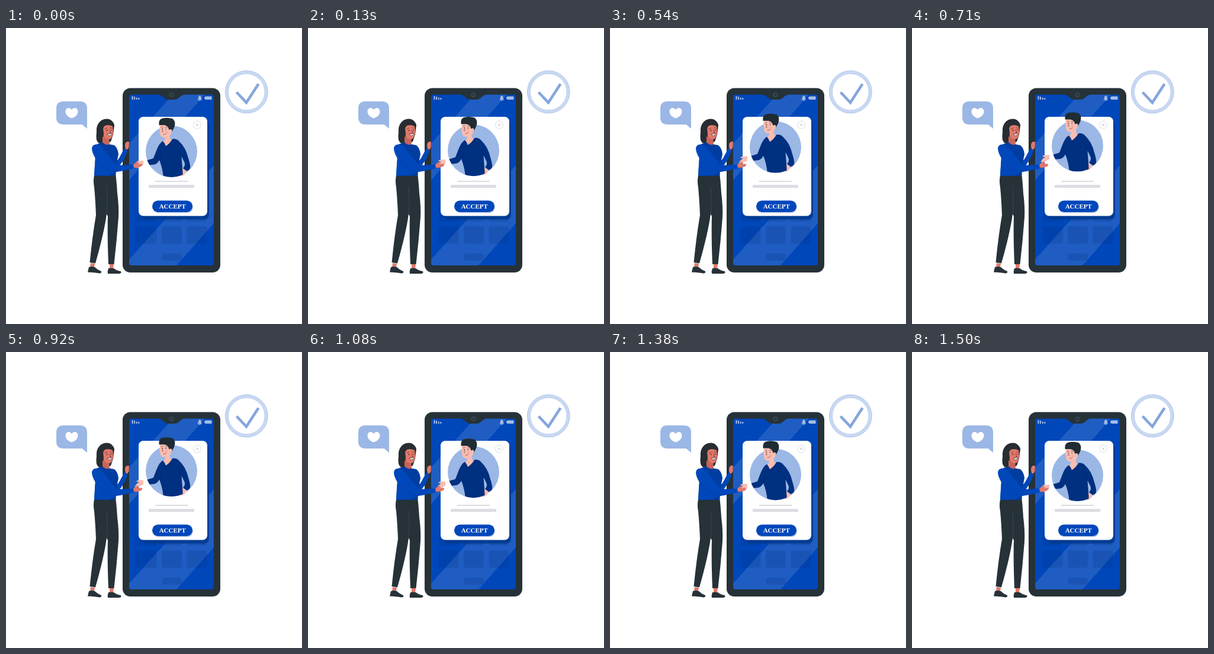
These frames come from a looping animation (500x500 px, 1.54 s). An HTML page:

```html
<!DOCTYPE html>
<html lang="en">
<head>
<meta charset="utf-8">
<style>
  html, body { margin: 0; width: 100%; height: 100%; overflow: hidden; background: #fff; }
  svg { display: block; width: 100%; height: 100%; }
  .line { fill: none; stroke-linecap: round; stroke-linejoin: round; }
</style>
</head>
<body>
<svg viewBox="0 0 500 500">
  <defs>
    <clipPath id="portrait"><path d="M210 130H350V208.5H323A43.5 43.5 0 0 1 236 208.5H210Z"/></clipPath>
  </defs>

  <g id="check" fill="none">
    <circle cx="406.3" cy="108" r="33.3" stroke="#c8d8f2" stroke-width="5.4"/>
    <circle cx="406.3" cy="108" r="36" stroke="#a5bce3" stroke-width=".7"/>
    <circle cx="406.3" cy="108" r="30.7" stroke="#b3c6e8" stroke-width=".6"/>
    <path d="M389.5 108.5 406 126 426.500 94.500" stroke="#85a6dc" stroke-width="4.6"/>
  </g>

  <g id="bubble">
    <path d="M97 124H125Q137 124 137 136V170L128.500 163H97Q85 163 85 151V136Q85 124 97 124Z" fill="#9bb7e5"/>
    <path d="M111 138C107 132.500 100.500 135 100.500 141C100.500 147 106 151 111 152.500C116 151 121.500 147 121.500 141C121.500 135 115 132.500 111 138Z" fill="#fff"/>
  </g>

  <g id="phone">
    <rect x="197" y="101.500" width="165" height="311.500" rx="13" fill="#263238"/>
    <path d="M212 112.500H256C265 112.500 266 121 275 121H284C293 121 294 112.500 303 112.500H347Q351 112.500 351 116.500V397Q351 401 347 401H212Q208 401 208 397V116.500Q208 112.500 212 112.500Z" fill="#0047ba"/>
    <path d="M274 121H284C293 121 294 112.500 303 112.500H336L208 257V195ZM351 232V330L288 401H212Q208 401 208 397V391Z" fill="#fff" opacity=".12"/>
    <circle cx="279.500" cy="113" r="4.300" fill="#37474f"/>
    <circle cx="279.500" cy="113" r="2.300" fill="#29363d"/>
    <g fill="#a5bde6">
      <path d="M212.500 115h2v6h-2zM216 116h2v5h-2zM219.700 117.500h2v3.500h-2zM223.300 118h2v3h-2z"/>
      <path d="M323.300 121.500Q325 120 325 117.500Q325 114.500 327.300 114Q329.700 114.500 329.700 117.500Q329.700 120 331.300 121.500ZM326 122h2.600v1H326z"/>
      <path d="M335 117.300l2-1.700h10.500v5.400H337l-2-1.700z"/>
    </g>
    <g fill="#002d78" opacity=".18">
      <rect x="221" y="300" width="34" height="27" rx="4"/>
      <rect x="263" y="300" width="34" height="27" rx="4"/>
      <rect x="305" y="300" width="34" height="27" rx="4"/>
      <rect x="220.500" y="335" width="34" height="29.500" rx="4"/>
      <rect x="263" y="335" width="34" height="29.500" rx="4"/>
      <rect x="305.500" y="335" width="34" height="29.500" rx="4"/>
      <rect x="263" y="381" width="34" height="12" rx="5"/>
    </g>
    <rect x="229" y="156" width="114" height="167.500" rx="8" fill="#00398f" opacity=".85"/>
    <rect x="224" y="150" width="116" height="167.500" rx="8" fill="#fff"/>
    <circle cx="323" cy="163.500" r="6.500" fill="none" stroke="#cfd3da" stroke-width=".8"/>
    <path d="M321 161.500l4 4m0-4l-4 4" stroke="#a9afba" stroke-width=".8"/>
    <path d="M252 258h55v2h-55zM241 265h77v5h-77z" fill="#dddce3"/>
    <rect x="248" y="293" width="68" height="19.500" rx="9.700" fill="#bccbe6"/>
    <rect x="247" y="291.500" width="68" height="19.500" rx="9.700" fill="#0047ba"/>
    <text x="281.300" y="305" fill="#fff" text-anchor="middle" font-family="'Liberation Serif', serif" font-weight="700" font-size="11">ACCEPT</text>
  </g>

  <g id="man">
    <circle cx="279.500" cy="208.500" r="43.500" fill="#9bb7e5"/>
    <path d="M232 224Q225 224 221.500 225L220 226.500 225 227.500Q220 230 217.500 235.500Q222 237.500 227 234L232 231Z" fill="#f9bdb1"/>
    <path d="M298 237Q293 240 293 247.500Q294 251 299 249.500Q303 247 306 240Z" fill="#f9bdb1"/>
    <path d="M276 177L277 187 283 190 270 200 265 192Q270 189 269 183Z" fill="#f9bdb1"/>
    <g fill="#003080" clip-path="url(#portrait)">
      <path d="M265 191Q268 194 270 199.500Q277 195 281 187.500Q288 186.500 292 191Q304 202 308 220Q312 233 311 237Q309 241 305 241.500L299 237Q304 232 301 226L296.500 217L298.500 244 299 255H266Q265 238 259 223Q256 229 251 230.500Q240 232 230 231L229 224.500Q241 223 249 220Q251 215 254 207Q259 194 265 191Z"/>
    </g>
    <path d="M296.500 217L293 207M259 223Q261 220 261.500 214" class="line" stroke="#00255f" stroke-width=".7"/>
    <path d="M260 163Q259 170 260 178Q261 185 267 185.500Q276 185 279 178L282 169 278 163Z" fill="#f9bdb1"/>
    <path d="M258.500 164Q257.500 155 263 153Q273 150.500 282 153.500L285 158Q286.500 165 282 172Q280 177 278 176Q278 172 275.500 172L274 168Q272 165 268 164Z" fill="#1f2c33"/>
    <ellipse cx="278" cy="174" rx="2.400" ry="3" fill="#f9bdb1"/>
    <path d="M262 167.500l3-.4m4 .4l3 .7M265 171l-1.500 4 2 .3M266 180q3 .5 5-2" class="line" stroke="#6b3d3a" stroke-width=".7"/>
    <circle cx="264" cy="170.300" r=".8" fill="#1f2c33"/>
    <circle cx="270.300" cy="171" r=".8" fill="#1f2c33"/>
    <ellipse cx="271" cy="175.500" rx="2" ry="1.300" fill="#f09a91" opacity=".6"/>
  </g>

  <g id="woman">
    <path d="M202 204Q200 198 202 194Q205 190.500 208 192.500L207.500 202Q206 205 203 206Z" fill="#e0796b"/>
    <path d="M143 397l7 1-1 6h-7zM175 399h7l-1 8h-6z" fill="#e0796b"/>
    <g fill="#263238">
      <path d="M149 249H185.500Q187 262 188 279Q191 302 190 320Q187 360 182.500 399H173Q171 350 172 318L170 314Q166 345 151 397.500L141.500 396Q146 351 152 316Q151 290 149 269Q147 258 149 249Z"/>
      <path d="M140 404Q145 402 150 404Q155 409 161 411Q162 414 158 414.500Q150 413 138 412.500ZM173 406Q178 405 182 406Q187 410 194 411Q196 414 191 415H172Q171 411 173 406Z"/>
    </g>
    <path d="M170 268Q172 295 170 316" class="line" stroke="#45545c" stroke-width=".6"/>
    <path d="M157 160Q162 153 171 153.500Q180 154 183 164L181 180 177 192Q165 198 156 194Q151 190 153 176Q152 166 157 160Z" fill="#272d32"/>
    <path d="M163 183L163 194Q168 200 175 197L174 185Z" fill="#c9645a"/>
    <path d="M165 166Q172 162 180 166Q182.500 179 178 186Q174 190 168 186Q163 182 163 174Z" fill="#e0796b"/>
    <path d="M164 169Q167 163 172 162Q178 162 181.500 168L183 164Q180 155 171 155Q163 157 162 169L162 185Q165 183 165 178Z" fill="#272d32"/>
    <path d="M167 170.500l4-1.500m5-.5l3 .7M175 172l2 5-2 .3" class="line" stroke="#6d302f" stroke-width=".8"/>
    <circle cx="170.500" cy="173" r=".9" fill="#272d32"/>
    <circle cx="178" cy="172.300" r=".8" fill="#272d32"/>
    <path d="M171 179Q175 180 178 177.500Q178 182 174.500 182Q172 181.500 171 179Z" fill="#fff" stroke="#4e2a2a" stroke-width=".7"/>

    <path d="M183 224Q188 226 192 218L200 203 205.500 206.500Q202 219 193 231Q188 238 181 234Z" fill="#0047ba"/>
    <path d="M154 196L163 193Q169 199 175 196.500L183 198Q189 203 190 213Q186 230 185.500 249.500H149Q150 229 151 217Z" fill="#003da0"/>
    <path d="M215 231Q219 227 222 225.500L224 227.500 221.500 230Q226 228.500 230 230Q231 232 228 234Q222 237 215 235.500Z" fill="#e0796b"/>
    <path d="M145 203Q146 196 154 196.500Q160 197 164 203L187 232 215 230.500 216 237Q200 241 187 243Q180 244 174 249.500H149L151 220Q145 210 145 203Z" fill="#0047ba"/>
    <path d="M151 219Q162 235 178 241Q183 243 188 242" class="line" stroke="#003da0" stroke-width=".8"/>
  </g>
</svg>
<script>
  const LOOP = 1540, FLOAT = 1500, LIFT = 10;
  const man = document.getElementById("man");

  function draw(now) {
    const phase = Math.min(now % LOOP, FLOAT) / FLOAT;
    const lift = LIFT * (1 - Math.abs(1 - 2 * phase));
    man.setAttribute("transform", `translate(0 ${-lift})`);
    requestAnimationFrame(draw);
  }
  draw(0);
</script>
</body>
</html>
```
